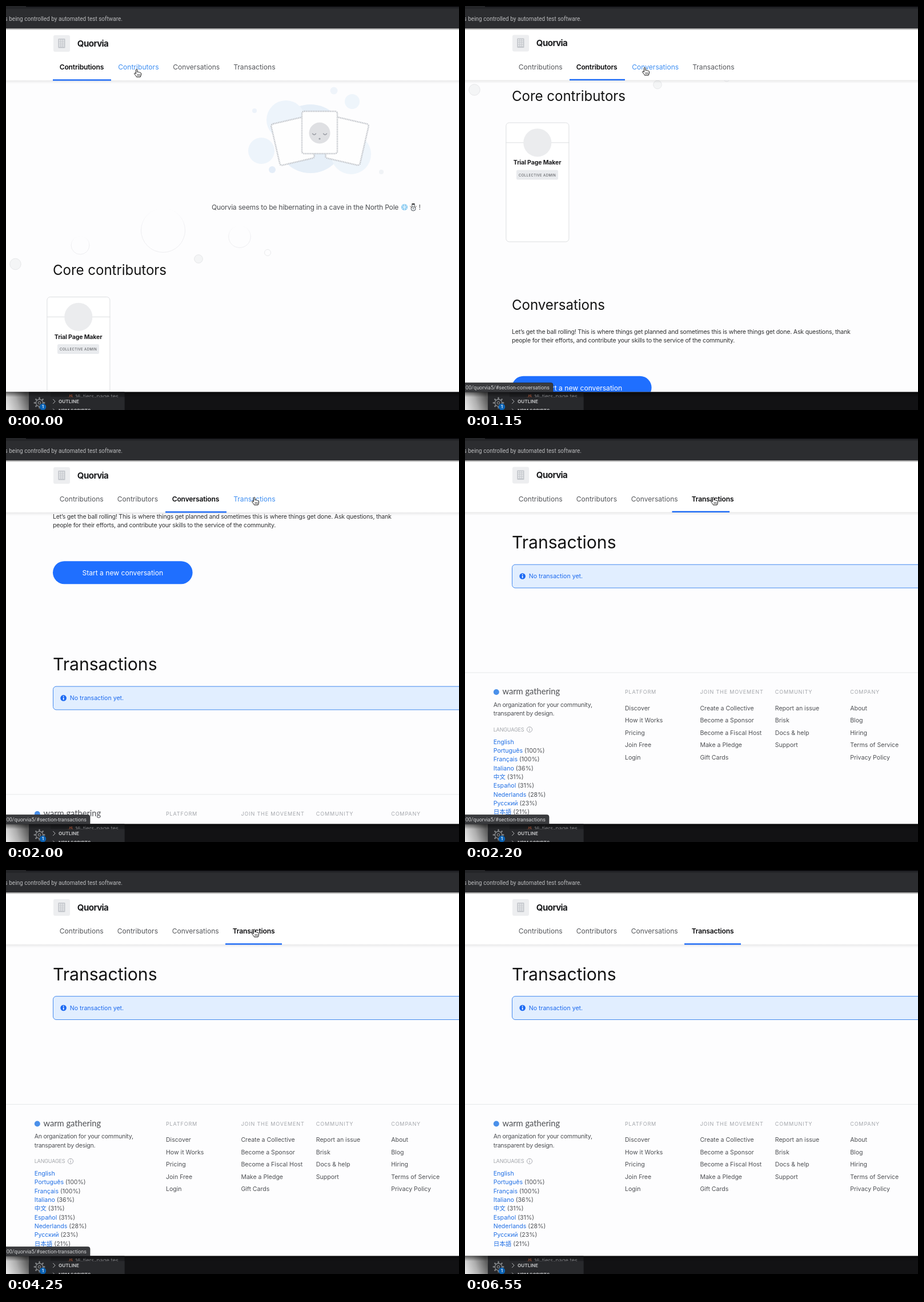
Animation of 793x706 px, one loop 6.6 s. Source, as an HTML page:

```html
<!DOCTYPE html>
<html lang="en">
<head>
<meta charset="utf-8">
<title>Section navigation</title>
<style>
  html, body { margin: 0; width: 100%; height: 100%; overflow: hidden; background: #fdfdfe; }
  svg { display: block; width: 793px; height: 706px; }
  text { font-family: Inter, "Noto Sans CJK SC", "Noto Sans CJK JP", sans-serif; font-size: 10.57px; fill: #4e5054; white-space: pre; }
  .chrome { font-family: Roboto, sans-serif; }
  .tab { font-size: 12.1px; }
  .h2 { font-size: 24.1px; letter-spacing: -.05px; fill: #141414; }
  .body { letter-spacing: -.205px; fill: #313233; }
  .cap { font-size: 9.06px; letter-spacing: .83px; fill: #a4a7ac; }
  .link { fill: #1f6fe5; }
</style>
</head>
<body>
<svg id="stage" viewBox="0 0 793 706">
  <defs>
    <clipPath id="view"><rect y="130" width="793" height="544.5"/></clipPath>
    <clipPath id="file"><rect y="675" width="793" height="9"/></clipPath>
    <linearGradient id="shade" x1="0" y1="0" x2="0" y2="1">
      <stop stop-color="#000" stop-opacity=".08"/><stop offset="1" stop-color="#000" stop-opacity="0"/>
    </linearGradient>
    <linearGradient id="edge" x1="0" y1="0" x2="0" y2="1">
      <stop stop-color="#000" stop-opacity=".45"/><stop offset="1" stop-color="#000" stop-opacity="0"/>
    </linearGradient>
    <linearGradient id="desk" x1="0" y1=".8" x2="1" y2=".5">
      <stop stop-color="#e6e6e6"/><stop offset=".5" stop-color="#b0b0b0"/><stop offset="1" stop-color="#5c5c5c"/>
    </linearGradient>
    <linearGradient id="drop" x1="0" y1="0" x2="0" y2="1">
      <stop stop-color="#000" stop-opacity=".5"/><stop offset="1" stop-color="#000" stop-opacity="0"/>
    </linearGradient>
    <linearGradient id="bubble" x1="0" y1="0" x2="0" y2="1">
      <stop stop-color="#ededf0" stop-opacity="0"/><stop offset=".5" stop-color="#ededf0"/>
    </linearGradient>
  </defs>
  <rect width="793" height="706" fill="#fdfdfe"/>
  <g clip-path="url(#view)"><g id="page"></g></g>
  <g id="header"></g>
  <g id="frame"></g>
  <g id="status">
    <path id="statusBox" fill="#3a3b3e" stroke="#232427" stroke-width=".7"/>
    <text id="statusText" class="chrome" y="670" text-anchor="end" style="font-size:9.05px;fill:#d2d3d5"/>
  </g>
  <g id="cursor" stroke-linejoin="round" stroke-linecap="round">
    <g id="hand" stroke="#111" stroke-width="1">
      <path fill="#fff" d="M-1.6 7V.8C-1.6-.9.9-.9.9.8V4.6C1.4 3.8 3.1 4 3.3 5C4 4.3 5.3 4.6 5.5 5.6C6.3 5.1 7.5 5.6 7.5 6.7V9C7.5 10.7 6.4 11.4 6.2 13H-.6C-1 11.2-3.2 9.4-4.3 7.6C-4.9 6.3-3.2 5.6-2.4 6.3Z"/>
      <path fill="none" stroke-width=".7" d="M1.2 8.2V11M3.1 8.2V11M5 8.2V11"/>
    </g>
    <path id="arrow" fill="#111" stroke="#fff" stroke-width=".9" d="M0 0V12L2.8 9.5L4.7 13.8L6.7 12.9L4.8 8.8H8.5Z"/>
  </g>
</svg>
<script>
const LOOP = 6600, STEP = 50;
const $ = id => document.getElementById(id);
const text = (x, y, body, cls = '', style = '') => `<text x="${x}" y="${y}" class="${cls}" style="${style}">${body}</text>`;
const circle = (x, y, r, fill, extra = '') => `<circle cx="${x}" cy="${y}" r="${r}" fill="${fill}" ${extra}/>`;
const rect = (x, y, w, h, fill, extra = '') => `<rect x="${x}" y="${y}" width="${w}" height="${h}" fill="${fill}" ${extra}/>`;
const line = (d, stroke, width = 1) => `<path d="${d}" fill="none" stroke="${stroke}" stroke-width="${width}" stroke-linecap="round"/>`;

function hibernation() {
  const blobs = [[533, 232, 60, '#e6eff8'], [490, 199, 34, '#edf4fb'], [447, 253, 23, '#edf4fb'], [604, 259, 35, '#eef5fb'],
    [606, 167, 13, '#eef5fb'], [574, 148, 6.5, '#eff4fa'], [435, 183, 4, '#edf3fa'], [466, 286, 6, '#e4edf8'], [657, 290, 4, '#f0f3f6']];
  const dots = 'fill="#fefefe" stroke="#c4c7cc" stroke-width="2.6" stroke-dasharray="1.9 1.1" stroke-linejoin="round"';
  const card = (angle, cx, cy) => `<rect x="${cx - 31}" y="${cy - 37}" width="62" height="74" rx="4" transform="rotate(${angle} ${cx} ${cy})" ${dots}/>`;
  const outline = 'stroke="url(#bubble)" stroke-width="1"';
  return blobs.map(b => circle(...b)).join('') + card(-13, 502, 236) + card(13, 597, 236) + card(0, 549, 221) +
    circle(549, 222, 18.5, '#dfe0e3') +
    line('M536.5 223q3 4 6 0M555.5 223q3 4 6 0', '#9a9da4', 1.4) + circle(549, 232, 1.6, '#9a9da4') +
    text(360, 356, 'Quorvia seems to be hibernating in a cave in the North Pole', '', 'font-size:12.08px;letter-spacing:-.2px') +
    circle(697.5, 351.5, 5.6, '#8fcdf2') +
    line('M697.5 347v9M693.6 349.2l7.8 4.6M693.6 353.8l7.8-4.6', '#eef9ff') +
    circle(713, 354, 4, '#e9edf0', 'stroke="#555a60" stroke-width="1"') + circle(713, 348.8, 2.6, '#f2f4f5', 'stroke="#555a60"') +
    rect(710.5, 345, 5, 2.2, '#333') + line('M707.5 350l2.5 2M718.5 350l-2.5 2', '#6c5a4c') + circle(713, 354, .8, '#333') +
    text(722.5, 356, '!', '', 'font-size:12.08px') +
    circle(130, 418, 16, 'none', outline) + circle(275, 392, 38.5, 'none', outline) + circle(409, 403, 19.3, 'none', outline) +
    circle(458, 431, 5.5, 'none', 'stroke="#e9eaec"') + circle(337, 442, 7.3, '#f4f5f6', 'stroke="#e6e7e9"') +
    circle(16.5, 451, 9.7, '#f4f5f6', 'stroke="#e6e7e9"');
}

function contributors() {
  const middle = 'text-anchor:middle;';
  return text(82, 470, 'Core contributors', 'h2') +
    rect(71.9, 508.5, 110, 208, '#fff', 'rx="5.5" stroke="#dcdee0"') + line('M72 543.3H182', '#dcdee0') +
    circle(126.8, 543.3, 24.6, '#ebecee') +
    text(126.6, 581.6, 'Trial Page Maker', '', middle + 'font-weight:700;letter-spacing:-.15px;fill:#1c1c1e') +
    rect(90, 591, 73, 17, '#e9ebee', 'rx="2.5"') +
    text(126.6, 602, 'COLLECTIVE ADMIN', '', middle + 'font-size:6px;letter-spacing:.4px');
}

function conversations() {
  return text(82, 835.7, 'Conversations', 'h2') +
    text(82, 877, 'Let’s get the ball rolling! This is where things get planned and sometimes this is where things get done. Ask questions, thank', 'body') +
    text(82, 892.4, 'people for their efforts, and contribute your skills to the service of the community.', 'body') +
    rect(82, 951.3, 244.6, 40, '#1f6fff', 'rx="20"') +
    text(204.3, 976, 'Start a new conversation', '', 'text-anchor:middle;font-size:12.08px;fill:#fff');
}

function transactions() {
  return text(82, 1142, 'Transactions', 'h2', 'font-size:30.2px') +
    rect(82.5, 1170.2, 730, 40.8, '#e1eeff', 'rx="5.5" stroke="#4389ee"') +
    circle(100.6, 1190.5, 5.3, '#1b69f3') + rect(99.8, 1189.7, 1.7, 4, '#fff') + circle(100.6, 1187.7, .95, '#fff') +
    text(111.7, 1194.4, 'No transaction yet.', '', 'fill:#1b69ee');
}

function footer() {
  const columns = [
    [280, 'PLATFORM', 'Discover,How it Works,Pricing,Join Free,Login'],
    [411.4, 'JOIN THE MOVEMENT', 'Create a Collective,Become a Sponsor,Become a Fiscal Host,Make a Pledge,Gift Cards'],
    [542.8, 'COMMUNITY', 'Report an issue,Brisk,Docs &amp; help,Support'],
    [674.2, 'COMPANY', 'About,Blog,Hiring,Terms of Service,Privacy Policy']];
  const languages = 'English,Português (100%),Français (100%),Italiano (36%),中文 (31%),Español (31%),Nederlands (28%),Русский (23%),日本語 (21%)';
  const language = (entry, i) => {
    const [name, share = ''] = entry.split(' ');
    return text(49.7, 1483.6 + i * 15.32, `<tspan class="link">${name}</tspan> ${share}`);
  };
  return line('M0 1359H793', '#e6e8ea') + circle(54.8, 1393, 5, '#4a90ea') +
    text(65.5, 1397, 'warm gathering', '', 'font-family:Lato,sans-serif;font-size:14.7px') +
    text(49.7, 1418.6, 'An organization for your community,', '', 'letter-spacing:-.24px') +
    text(49.7, 1434, 'transparent by design.', '', 'letter-spacing:-.24px') +
    text(49.7, 1461.6, 'LANGUAGES', 'cap', 'letter-spacing:-.2px') +
    circle(113, 1458.4, 4.6, 'none', 'stroke="#9da0a6" stroke-width=".9"') + line('M113 1458V1460.6M113 1456V1456.1', '#9da0a6') +
    languages.split(',').map(language).join('') +
    columns.map(([x, title, items]) => text(x, 1396, title, 'cap') +
      items.split(',').map((item, i) => text(x, 1424.6 + i * 21.5, item)).join('')).join('');
}

const tabs = [
  { name: 'Contributions', x: 94, from: 82, to: 184 },
  { name: 'Contributors', x: 195, from: 183, to: 280 },
  { name: 'Conversations', x: 291, from: 279, to: 386 },
  { name: 'Transactions', x: 397, from: 384, to: 483 }];

function headerArt() {
  let windows = '';
  for (let row = 0; row < 4; row++)
    for (let col = 0; col < 3; col++) windows += rect(93 + col * 3.3, 58.8 + row * 3.3, 2.1, 2.1, '#eeeff1');
  return rect(0, 36, 793, 94, '#fff') + rect(0, 130, 793, 6, 'url(#shade)') +
    rect(83, 51, 29, 29, '#edeef0', 'rx="3"') + rect(91.3, 57, 12.2, 16.5, '#c4c7cc', 'rx="1"') + windows +
    text(124.8, 70.6, 'Quorvia', '', 'font-size:15.1px;font-weight:700;letter-spacing:-.6px;fill:#1d1e20') +
    tabs.map((tab, i) => `<text id="tab${i}" class="tab" y="111.4">${tab.name}</text>`).join('') +
    '<rect id="underline" y="128.2" height="2.4" fill="#1b69f5"/>';
}

function frameArt() {
  let teeth = '';
  for (let i = 0; i < 8; i++) {
    const a = i * Math.PI / 4, c = Math.cos(a), s = Math.sin(a);
    teeth += `M${58.5 + 6 * c} ${693.5 + 6 * s}L${58.5 + 8.8 * c} ${693.5 + 8.8 * s}`;
  }
  return rect(0, 0, 793, 39, '#2c2d30') + rect(0, 0, 793, 5, '#242528') + rect(35, 0, 758, 1.6, '#08080a') +
    rect(0, 39, 793, 3.5, 'url(#edge)') +
    text(204, 26, 's being controlled by automated test software.', 'chrome', 'text-anchor:end;font-size:10px;fill:#b9babc') +
    rect(0, 674.5, 793, 32, '#121214') + rect(0, 674.5, 40, 32, 'url(#desk)') +
    rect(40, 674.5, 38, 32, '#27282b') + rect(78, 674.5, 129.5, 32, '#202124') +
    `<g clip-path="url(#file)">${text(108.5, 685, 'JS', '', 'font-size:7px;font-weight:700;fill:#b4593a')}${text(121, 685.5, '16-tiers-page.tes', '', 'font-size:9.4px;fill:#8b8c8f')}</g>` +
    rect(78, 683.5, 129.5, 23, '#28292c') +
    line('M82.5 687.3l3.6 3.7l-3.6 3.7', '#b5b6b8') + line('M82.5 704l3 3', '#b5b6b8') +
    text(92, 694, 'OUTLINE', '', 'font-size:8.2px;font-weight:700;fill:#bcbdbf') +
    text(92, 710, 'NPM SCRIPTS', '', 'font-size:8.2px;font-weight:700;fill:#bcbdbf') +
    line(teeth, '#818386', 2.4) + circle(58.5, 693.5, 6, '#27282b', 'stroke="#818386" stroke-width="1.3"') +
    circle(58.5, 693.5, 2.2, 'none', 'stroke="#818386" stroke-width="1.2"') + circle(64.5, 700.5, 5.7, '#0b62b4') +
    text(64.5, 703.2, '1', '', 'text-anchor:middle;font-size:7.4px;font-weight:600;fill:#fff') +
    rect(0, 674.5, 793, 9, 'url(#drop)');
}

$('page').innerHTML = hibernation() + contributors() + conversations() + transactions() + footer();
$('header').innerHTML = headerArt();
$('frame').innerHTML = frameArt();

const clamp = p => Math.max(0, Math.min(1, p));
const smooth = p => (1 - Math.cos(Math.PI * clamp(p))) / 2;
const easeOut = p => 1 - (1 - clamp(p)) ** 2.4;
const mix = (a, b, p) => a + (b - a) * p;

// [start, duration, from, to]
const scrolls = [[250, 250, 0, 304.5], [1180, 250, 304.5, 655], [1912, 250, 655, 949]];
const switches = [380, 1255, 2055];
const pointer = [[0, 230, 117], [700, 230, 117], [1150, 316, 114], [1450, 342, 110], [1900, 436, 110],
  [5700, 436, 110], [5850, 425, 150], [6250, -15, 690]];

function scrollAt(t) {
  if (t >= 2850) return 949.5;
  return scrolls.reduce((y, [start, span, from, to]) => t >= start ? mix(from, to, smooth((t - start) / span)) : y, 0);
}

function pointerAt(t) {
  const next = pointer.findIndex(key => key[0] > t);
  if (next < 0) return pointer[pointer.length - 1].slice(1);
  const [start, x0, y0] = pointer[next - 1], [end, x1, y1] = pointer[next];
  const p = smooth((t - start) / (end - start));
  return [mix(x0, x1, p), mix(y0, y1, p)];
}

function drawTabs(t, active, x, y) {
  tabs.forEach((tab, i) => {
    const el = $('tab' + i), on = i === active;
    const left = tab.x + (active < i ? 1.5 : 0);
    const hover = !on && y < 125 && x > left && x < tab.to - 12;
    el.setAttribute('x', left - .3);
    el.style.fontWeight = on ? 600 : 400;
    el.style.letterSpacing = on ? '-.17px' : '0';
    el.style.fill = on ? '#0c0c0e' : hover ? '#3f8ff2' : '#56585c';
  });
  const last = tabs[Math.max(0, active - 1)], now = tabs[active];
  const p = active ? easeOut((t - switches[active - 1]) / 300) : 1;
  const from = mix(last.from, now.from, p), to = mix(last.to, now.to, p);
  $('underline').setAttribute('x', from);
  $('underline').setAttribute('width', to - from);
}

function drawStatus(t) {
  const [section, end] = t < 980 ? ['contributors', 138] : t < 1730 ? ['conversations', 148] : ['transactions', 141];
  $('status').style.display = t >= 100 && t < 6420 ? '' : 'none';
  $('statusBox').setAttribute('d', `M-2 658.5H${end + 2.5}q3.5 0 3.5 3.5V674.5H-2Z`);
  $('statusText').setAttribute('x', end);
  $('statusText').textContent = `00/quorvia5/#section-${section}`;
}

function draw(t) {
  const [x, y] = pointerAt(t), active = switches.filter(s => t >= s).length;
  const raised = (t >= 500 && t < 1900) || (t >= 2150 && t < 2800);
  $('page').setAttribute('transform', `translate(0 ${-scrollAt(t)})`);
  $('header').setAttribute('transform', `translate(0 ${raised ? -.5 : 0})`);
  drawTabs(t, active, x, y);
  drawStatus(t);
  $('cursor').setAttribute('transform', `translate(${x - 1} ${y - 6})`);
  $('cursor').style.display = t < 6250 ? '' : 'none';
  $('hand').style.display = y < 128 ? '' : 'none';
  $('arrow').style.display = y < 128 ? 'none' : '';
}

const begin = performance.now();
function tick() {
  const t = (performance.now() - begin) % LOOP;
  draw(Math.floor(t / STEP) * STEP);
  requestAnimationFrame(tick);
}
draw(0);
requestAnimationFrame(tick);
</script>
</body>
</html>
```
